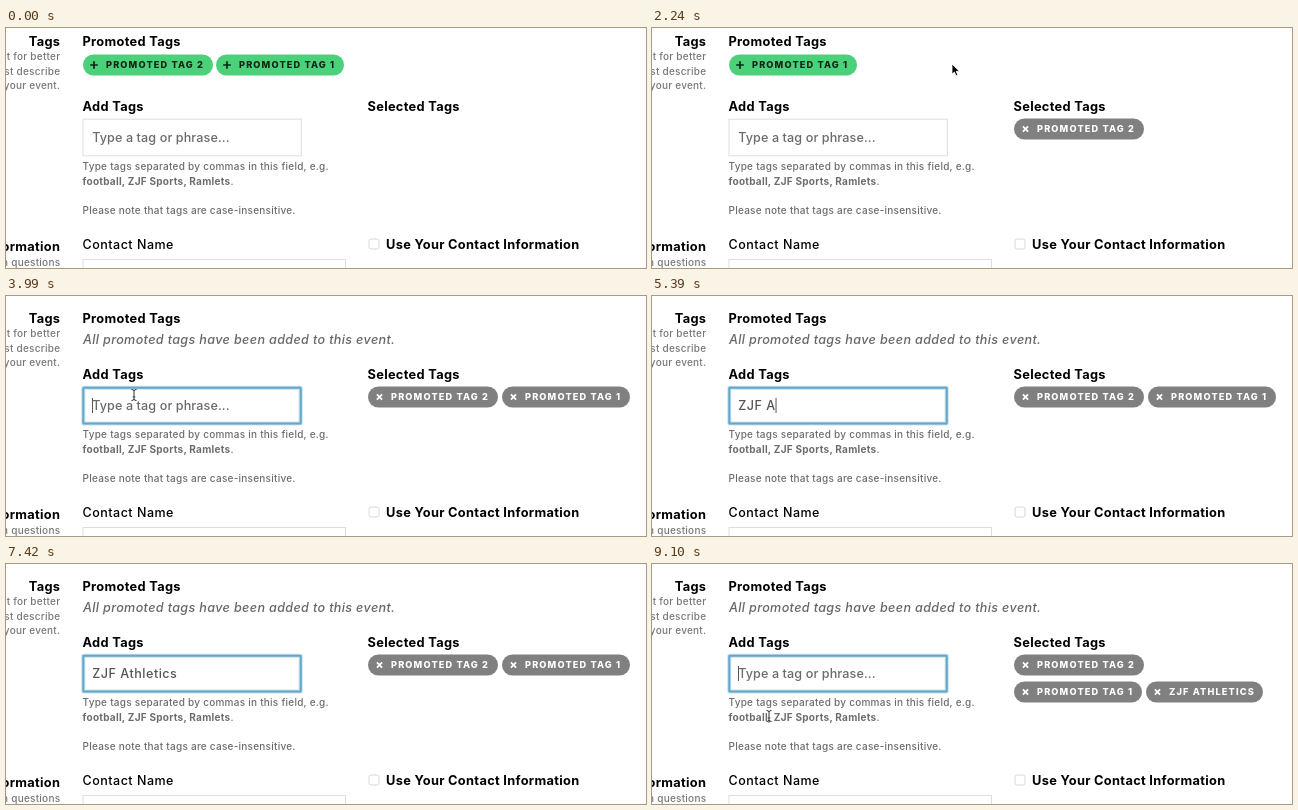
Recreate the animation shown at these times as an HTML page. Size 640 by 240 pixels, loop 9.17 s.

```html
<!DOCTYPE html>
<html lang="en">
<head>
<meta charset="utf-8">
<title>Tag picker</title>
<style>
html, body { margin: 0; width: 100%; height: 100%; overflow: hidden; background: #fff; }
svg { display: block; width: 640px; height: 240px; font-family: Inter, "Open Sans", sans-serif; font-weight: 500; }
text { white-space: pre; }
.head { font-size: 12.8px; font-weight: 700; letter-spacing: .32px; }
.label { font-size: 12.5px; letter-spacing: .5px; }
.help { font-size: 10px; letter-spacing: .25px; fill: #6c6c6c; }
.side { fill: #777; }
.note { font-size: 12.6px; font-style: italic; letter-spacing: .35px; fill: #666; }
.hint { font-size: 12.6px; letter-spacing: .1px; fill: #6b6b6b; }
.typed { font-size: 12.6px; letter-spacing: .5px; fill: #555; }
.tag { font-size: 9.2px; font-weight: 800; letter-spacing: 1.15px; }
.end { text-anchor: end; }
</style>
</head>
<body>
<svg id="stage" viewBox="0 0 640 240" xmlns="http://www.w3.org/2000/svg"></svg>
<script>
const LOOP = 9170, STEP = 70, BLINK = 610;
const ENTER = 980, FIRST_ADDED = 1960, SECOND_ADDED = 2940, FOCUS = 3780;
const TYPE = 4760, SUBMIT = 7980, HIDE = 4410;
const WORD = "ZJF Athletics";

// Pointer stops
const stop = (t, x, y) => ({ t, x, y });
const ROUTES = [
  [stop(ENTER, 49, 206), stop(1120, 144.5, 68), stop(FIRST_ADDED, 172, 36), stop(2240, 300, 36),
   stop(SECOND_ADDED, 162, 38), stop(3010, 168.5, 63), stop(3360, 128, 99), stop(HIDE, 128, 99)],
  [stop(8050, 135, 104), stop(8750, 121, 148), stop(9100, 117, 152), stop(LOOP, 117, 152)]
];

const text = (x, y, cls, s, id = "") => `<text x="${x}" y="${y}" class="${cls}" ${id && `id="${id}"`}>${s}</text>`;
const group = (id, body) => `<g id="${id}">${body}</g>`;
const ring = (w, alpha) => `<rect x="77.3" y="91.7" width="217.4" height="35.8" rx=".5" stroke-width="${w}" stroke-opacity="${alpha}"/>`;

function pill(id, w, label, added) {
  const icon = added ? "M8.9 -2.6l5.2 5.2m0 -5.2l-5.2 5.2" : "M7.2 0h7.6M11 -3.8v7.6";
  const ink = added ? "#fff" : "#102417";
  return group(id, `<rect y="-10.5" width="${w}" height="21" rx="10.5" fill="${added ? "#808080" : "#4ad17a"}"/>
    <path d="${icon}" stroke="${ink}" stroke-width="1.7" fill="none"/>
    <text x="23" y="3.4" class="tag" fill="${ink}">${label}</text>`);
}

const stage = document.getElementById("stage");
stage.innerHTML = `
  <rect width="640" height="240" fill="#fff"/>
  ${group("top",
    text(54.3, 17.6, "head end", "Tags") +
    ["t for better", "st describe", "your event."].map((s, i) => text(54.3, 32.3 + 14.4 * i, "help side end", s)).join("") +
    text(76.5, 18.3, "head", "Promoted Tags"))}
  ${text(77, 48.4, "note", "All promoted tags have been added to this event.", "note")}
  ${pill("offer2", 130, "PROMOTED TAG 2")}
  ${pill("offer1", 128, "PROMOTED TAG 1")}
  ${text(76.5, 82.5, "head", "Add Tags")}
  ${text(361.5, 82.5, "head", "Selected Tags")}
  ${pill("added2", 130, "PROMOTED TAG 2", true)}
  ${pill("added1", 128, "PROMOTED TAG 1", true)}
  ${pill("added3", 117, WORD.toUpperCase(), true)}
  <rect x="77" y="91.2" width="218.3" height="36.6" fill="#fff" stroke="#ddd"/>
  <g id="focus" fill="none" stroke="#62a8cc">${ring(4, .35)}${ring(2, 1)}</g>
  ${text(86.2, 114, "hint", "Type a tag or phrase...", "hint")}
  ${text(86.2, 114, "typed", "", "typed")}
  <rect id="caret" y="102" width="1" height="15" fill="#555"/>
  ${text(76.5, 142.4, "help", "Type tags separated by commas in this field, e.g.")}
  ${text(76.5, 156.6, "help", '<tspan font-weight="700">football, ZJF Sports, Ramlets</tspan>.')}
  ${text(76.5, 185.6, "help", "Please note that tags are case-insensitive.")}
  ${text(54.3, 222.5, "head end", "Information")}
  ${text(54.3, 238, "help side end", "n questions")}
  ${text(76.5, 220.5, "label", "Contact Name")}
  <rect x="77" y="231.5" width="262.5" height="30" fill="#fff" stroke="#ddd"/>
  <rect x="363" y="211" width="10" height="10" rx="2" fill="#fff" stroke="#d8d8d8"/>
  ${text(380, 220.5, "head", "Use Your Contact Information")}
  ${group("arrow", '<path d="M0 0V10.2L2.4 8 4 11.8 5.8 11 4.2 7.3H7.4Z" fill="#000" stroke="#fff" stroke-width=".8"/>')}
  ${group("beam", '<path d="M-2.5 -5.5Q0 -5.5 0 -4Q0 -5.5 2.5 -5.5M0 -4V4M-2.5 5.5Q0 5.5 0 4Q0 5.5 2.5 5.5M-1.3 2H1.3" fill="none" stroke="#333"/>')}
`;

const el = {};
stage.querySelectorAll("[id]").forEach(n => el[n.id] = n);
const show = (n, on) => n.style.display = on ? "" : "none";
const move = (n, x, y) => n.setAttribute("transform", `translate(${x} ${y})`);
const clamp = v => Math.max(0, Math.min(1, v));

function pointerAt(t) {
  const route = ROUTES.find(r => t >= r[0].t && t < r.at(-1).t);
  if (!route) return null;
  const i = route.findIndex(p => p.t > t), a = route[i - 1], b = route[i];
  const u = (t - a.t) / (b.t - a.t), k = u * u * (3 - 2 * u);
  return [a.x + (b.x - a.x) * k, a.y + (b.y - a.y) * k];
}

// Typing slows down a little with each key
const keyTime = k => TYPE + 128 * k + 7.1 * k * k;

function draw(t) {
  const one = t >= FIRST_ADDED, both = t >= SECOND_ADDED, done = t >= SUBMIT;

  move(el.top, 0, both ? 9 : 0);
  show(el.note, both);
  show(el.offer2, !one);
  show(el.offer1, !both);
  move(el.offer2, 77, 37);
  move(el.offer1, one ? 77 : 210, 37);

  show(el.added2, one);
  show(el.added1, both);
  show(el.added3, done);
  move(el.added2, 362, 101);
  move(el.added1, done ? 362 : 496, done ? 128 : 101);
  move(el.added3, 494, 128);

  el.focus.setAttribute("opacity", clamp((t - FOCUS + STEP) / (4 * STEP)));
  const word = done ? "" : [...WORD].filter((c, k) => keyTime(k) <= t).join("");
  el.typed.textContent = word;
  show(el.hint, !word);
  show(el.caret, t >= FOCUS && Math.floor((t - FOCUS) / BLINK) % 2 === 0);
  el.caret.setAttribute("x", 86 + (word ? el.typed.getComputedTextLength() : 0));

  const p = pointerAt(t), beam = t > 3150;
  show(el.arrow, p && !beam);
  show(el.beam, p && beam);
  if (p) move(beam ? el.beam : el.arrow, ...p);
}

const start = performance.now();
function tick() {
  const t = (performance.now() - start) % LOOP;
  draw(Math.floor(t / STEP) * STEP);
  requestAnimationFrame(tick);
}
tick();
</script>
</body>
</html>
```
